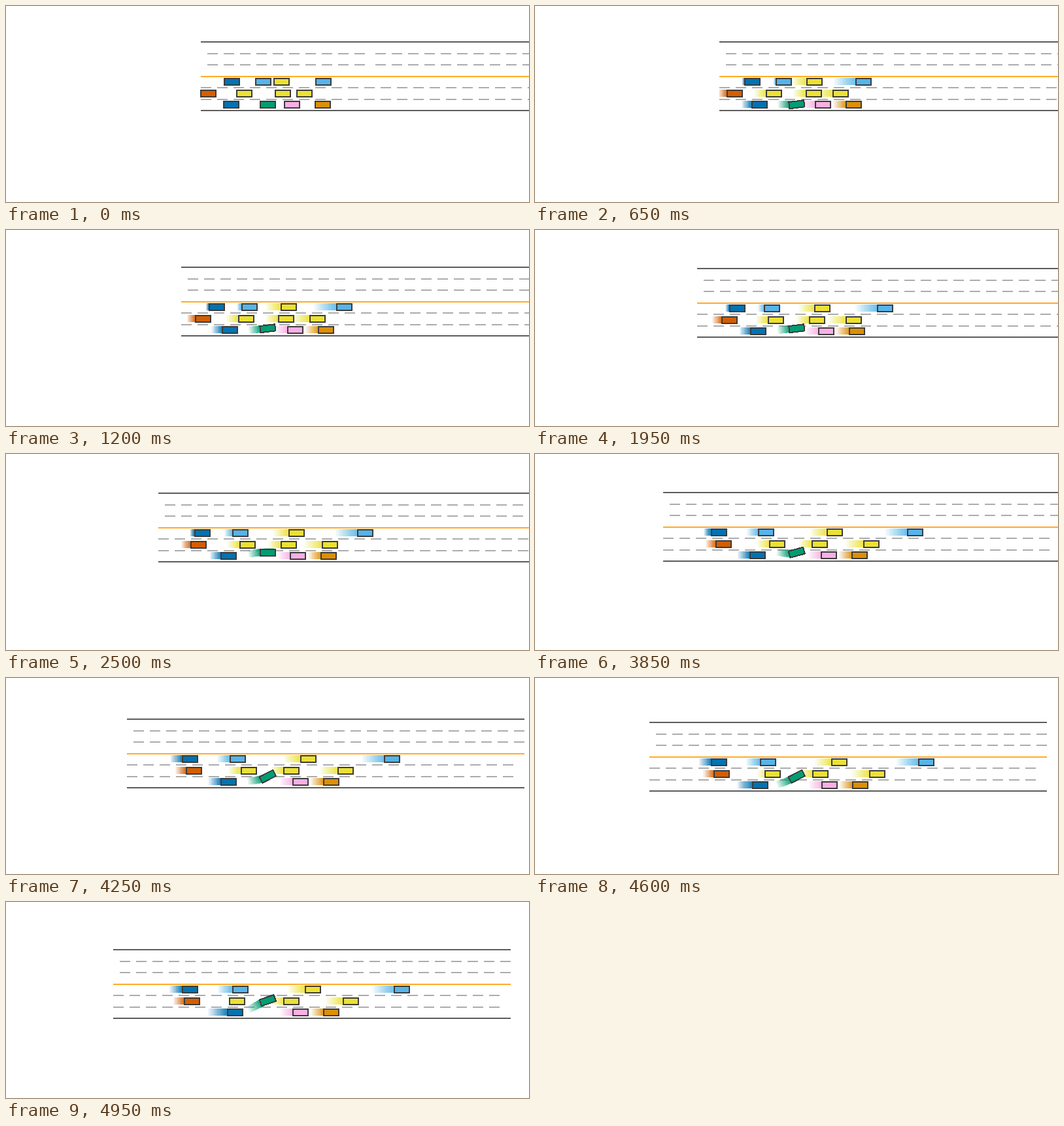
These frames come from a looping animation (800 px wide and 300 px high, 5 s). A matplotlib script:

```python
import numpy as np
import matplotlib.pyplot as plt
from matplotlib.animation import FuncAnimation
from matplotlib.collections import PolyCollection
from matplotlib.colors import to_rgb

W, H, DPI = 800, 300, 100
FRAMES, INTERVAL = 100, 50
LANE, ROAD_LEFT, ROAD_TOP, ROAD_LEN = 17.5, 298, 55, 608
CAR_SIZE, EGO_SIZE, EGO_CENTER = (25, 12), (24, 11), (400.3, 150.7)
HISTORY, TRAIL_MAX = 13, 0.85

BORDER, EDGE, DASH, MEDIAN = "#3c3c3c", "#5c5c5c", "#acacac", "#ffab26"
BLUE, SKY, YELLOW, RED = "#0173b2", "#56b4e9", "#ece133", "#d55e00"
GREEN, PINK, ORANGE = "#029e73", "#fbafe4", "#de8f05"

dt = INTERVAL / 1000
t = np.arange(FRAMES) * dt


def snap(v):
    return np.floor(np.asarray(v) + 0.5)


def roll(x, speed, gain=0, change=0, at=0):
    """Steadily accelerating travel, with a speed change from a given time."""
    return x + speed * t + gain * t**2 + change * np.maximum(0, t - at)


# Lane, colour and travel of each car along the road
CARS = [
    (3, BLUE, roll(333, 5, 1.1, 13.5, 3.65)),
    (3, SKY, roll(381, 3.6, 3.28)),
    (3, YELLOW, roll(409, 33.5, 0.65)),
    (3, SKY, roll(473, 51.8, -0.1)),
    (4, RED, roll(297, 17.8, 0.85)),
    (4, YELLOW, roll(352, 27.2, 0.25, -29.4, 4.33)),  # brakes to a halt
    (4, YELLOW, roll(411, 29.7)),
    (4, YELLOW, roll(444, 41.8, -0.08)),
    (5, BLUE, roll(332, 22.7, 0.7, 15, 4.3)),
    (5, PINK, roll(425, 29.7)),
    (5, ORANGE, roll(472, 29.7)),
]

# The green car steers through these (seconds, degrees); the camera follows it
STEERING = [(0.55, 0), (0.65, -7), (2, -7), (2.5, 0), (2.65, 10), (3, 10),
            (3.3, 4.5), (3.9, -17), (4.25, -27.5), (4.7, -27.5), (4.95, -19)]
turn = np.radians(np.interp(t, *zip(*STEERING)))
travel = roll(0, 24.9, 0.42)
climb = -np.gradient(travel, dt) * np.tan(turn) * dt
camera = np.column_stack([-travel, np.cumsum(climb) - climb / 2])


def box(cx, cy, length, width, angle=0.0):
    corners = np.array([(-1, -1), (1, -1), (1, 1), (-1, 1)]) * (length / 2, width / 2)
    c, s = np.cos(angle), np.sin(angle)
    return corners @ np.array([(c, s), (-s, c)]) + (cx, cy)


def road():
    shapes, colors = [], []

    def add(x, line, length, color):
        y = snap(ROAD_TOP + LANE * line)
        shapes.append(box(ROAD_LEFT + x + length / 2, y, length, 2))
        colors.append(color)

    def dashes(start, count, lines):
        for line in lines:
            for i in range(count):
                add(start + 25 * i, line, 16, DASH)

    dashes(10, 10, (1, 2))
    dashes(267, 14, (1, 2))
    dashes(0, 24, (4, 5))
    for line, color in ((0, EDGE), (3, MEDIAN), (6, EDGE)):
        add(0, line, ROAD_LEN, color)
    return np.array(shapes), colors


def pose(car, k, now):
    """Centre and angle of a car at step k, seen by the camera at step now."""
    if car == len(CARS):
        x, y = EGO_CENTER + camera[now] - camera[k]
        return x, y, turn[k]
    lane, _, track = CARS[car]
    x = snap(track[k] + camera[now, 0]) + CAR_SIZE[0] / 2
    y = snap(ROAD_TOP + LANE * (lane + 0.5)) + snap(camera[now, 1])
    return x, y, 0.0


fig = plt.figure(figsize=(W / DPI, H / DPI), dpi=DPI, facecolor="white")
ax = fig.add_axes([0, 0, 1, 1])
ax.set_xlim(0, W)
ax.set_ylim(H, 0)
ax.axis("off")


def layer(order, colors="none"):
    shapes = PolyCollection([], facecolors=colors, edgecolors="none",
                            linewidths=0, antialiaseds=False, zorder=order)
    shapes.set_snap(False)
    return ax.add_collection(shapes, autolim=False)


paints = [color for _, color, _ in CARS] + [GREEN]
sizes = [CAR_SIZE] * len(CARS) + [EGO_SIZE]
road_shapes, road_colors = road()
road_layer = layer(1, road_colors)
trail_layer = layer(2)
car_layer = layer(3, [c for paint in paints for c in (BORDER, paint)])


def draw(now):
    road_layer.set_verts(road_shapes + snap(camera[now]))

    trails, tints, bodies = [], [], []
    step = TRAIL_MAX / HISTORY
    for car, (paint, (length, width)) in enumerate(zip(paints, sizes)):
        # Oldest first, so the stacked copies build an even ramp
        for i, k in enumerate(range(max(0, now - HISTORY), now)):
            x, y, angle = pose(car, k, now)
            trails.append(box(x, y - 0.5, length, width - 1, angle))
            tints.append((*to_rgb(paint), step / (1 - step * i)))
        x, y, angle = pose(car, now, now)
        bodies.append(box(x, y, length, width, angle))
        bodies.append(box(x, y, length - 4, width - 4, angle))
    trail_layer.set_verts(trails)
    trail_layer.set_facecolor(tints or "none")
    car_layer.set_verts(bodies)
    return road_layer, trail_layer, car_layer


anim = FuncAnimation(fig, draw, frames=FRAMES, interval=INTERVAL,
                     repeat=True, repeat_delay=0, blit=False)
plt.show()
```
